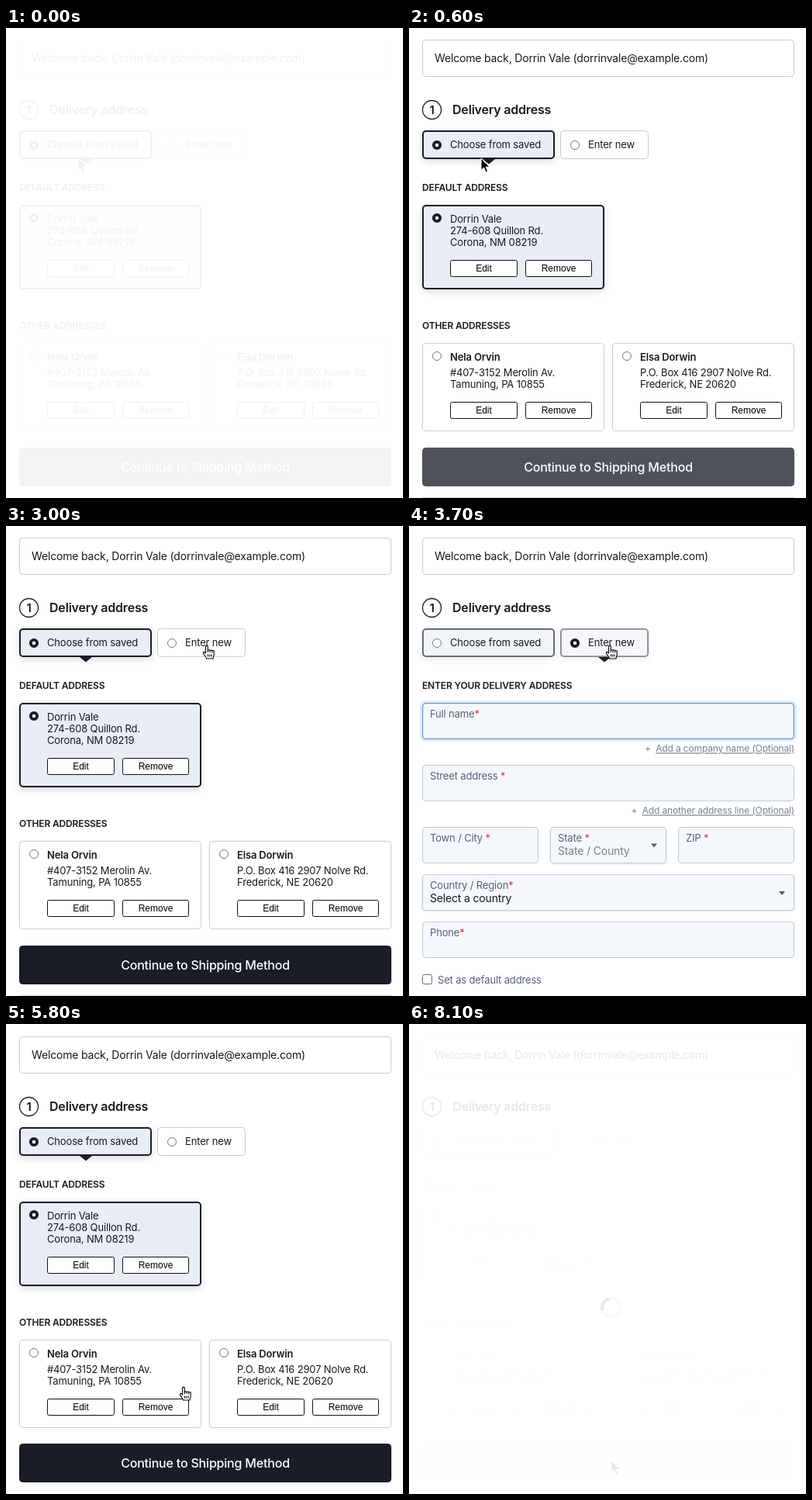
Write an HTML page that moves like this. It is 512 by 606 pixels and loops after 8.2 s.

```html
<!DOCTYPE html>
<html lang="en">
<head>
<meta charset="utf-8">
<title>Delivery address</title>
<style>
  html, body { margin: 0; width: 100%; height: 100%; overflow: hidden; background: #fff; }
  svg { display: block; width: 100vw; height: 100vh; }
  text { font-family: Inter, sans-serif; letter-spacing: -.012em; fill: #171922; }
  .button { font-family: "Liberation Sans", Arial, sans-serif; letter-spacing: 0; fill: #000; }
  .label { fill: #566077; }
  .link { fill: #78808f; }
  .hint { fill: #7b8088; }
  .white { fill: #fff; }
  .star { fill: #d23a3e; }
  .raised { filter: drop-shadow(0 3px 4px rgba(26, 29, 40, .17)); }
  .select { filter: drop-shadow(0 1px 1px rgba(26, 29, 40, .14)); }
</style>
</head>
<body>
<svg id="stage" viewBox="0 0 512 606"></svg>
<script>
const LOOP = 8200, STEP = 100;
const INK = '#1a1d28', LINE = '#c9cdd2', TINT = '#e8edf6';
const OPEN_FORM = 3700, CLOSE_FORM = 5100, SUBMIT = 6500;

// Outer edges are given; the stroke is drawn inside them.
const box = (x, y, w, h, fill = '#fff', stroke = LINE, sw = 1, r = 4, extra = '') =>
  `<rect x="${x + sw / 2}" y="${y + sw / 2}" width="${w - sw}" height="${h - sw}" rx="${r}"
    fill="${fill}" stroke="${stroke}" stroke-width="${sw}" ${extra}/>`;

// y is the middle of the capitals.
const text = (x, y, size, content, weight = 400, cls = '', anchor = 'start') =>
  `<text x="${x}" y="${y + size * .36}" font-size="${size}" font-weight="${weight}"
    class="${cls}" text-anchor="${anchor}">${content}</text>`;

const group = (id, ...parts) => `<g id="${id}">${parts.join('')}</g>`;
const radioOn = (x, y) => `<circle cx="${x}" cy="${y}" r="4.2" fill="#fff" stroke="${INK}" stroke-width="3.8"/>`;
const radioOff = (x, y) => `<circle cx="${x}" cy="${y}" r="5.5" fill="#fff" stroke="#747984"/>`;
const pointer = x => `<path d="M${x - 8} 169h16l-8 6.500z" fill="${INK}"/>`;
const caretDown = (x, y) => `<path d="M${x - 4} ${y - 2.5}h8l-4 5z" fill="#555c68"/>`;
const selected = (x, y, w, h, id) => box(x, y, w, h, TINT, INK, 2, 4, `class="raised" id="${id}"`);

const smallButton = (x, y, w, label) =>
  box(x, y, w, 22, '#fff', '#111', 1, 2) + text(x + w / 2, y + 11, 12, label, 400, 'button', 'middle');
const actions = (x, y) => smallButton(x, y, 87, 'Edit') + smallButton(x + 97, y, 86, 'Remove');

const addressCard = (x, name, street, city) =>
  box(x, 406, 235, 114) + radioOff(x + 19, 423) + text(x + 36, 424, 13, name, 600) +
  text(x + 36, 444, 13, street) + text(x + 36, 459, 13, city) + actions(x + 36, 482);

const field = (x, y, w, label, cls = '') =>
  box(x, y, w, 47, '#f4f8fc', '#c2cad5', 1, 4, `class="${cls}"`) +
  text(x + 10, y + 14, 13, `${label}<tspan class="star">*</tspan>`, 400, 'label');

const optionalLink = (y, label) =>
  text(497, y, 12, `+&#160; <tspan text-decoration="underline">${label}</tspan>`, 400, 'link', 'end');

const header = group('header',
  box(17, 15, 480, 48),
  text(33, 39, 14, 'Welcome back, Dorrin Vale (dorrinvale@example.com)'),
  `<circle cx="29.500" cy="105.500" r="12" fill="none" stroke="${INK}" stroke-width="1.300"/>`,
  text(29.5, 105.5, 15, '1', 600, '', 'middle'),
  text(56, 105.5, 16, 'Delivery address', 600));

const tabs = group('tabs',
  box(17, 132, 171, 37), box(195, 132, 114, 37),
  selected(17, 132, 171, 37, 'savedTab'), selected(195, 132, 114, 37, 'newTab'),
  text(53, 150.5, 13, 'Choose from saved'), text(231, 150.5, 13, 'Enter new'));

const saved = group('saved',
  radioOn(36, 151), radioOff(214, 151), pointer(103),
  text(17, 205.5, 12, 'DEFAULT ADDRESS', 600),
  selected(17, 228, 235, 109, 'defaultCard'), radioOn(36, 245),
  text(53, 246, 13, 'Dorrin Vale'),
  text(53, 261, 13, '274-608 Quillon Rd.'),
  text(53, 276, 13, 'Corona, NM 08219'),
  actions(53, 299),
  text(17, 383.5, 12, 'OTHER ADDRESSES', 600),
  addressCard(17, 'Nela Orvin', '#407-3152 Merolin Av.', 'Tamuning, PA 10855'),
  addressCard(262, 'Elsa Dorwin', 'P.O. Box 416 2907 Nolve Rd.', 'Frederick, NE 20620'));

const form = group('form',
  radioOff(36, 151), radioOn(214, 151), pointer(252),
  text(17, 205.5, 12, 'ENTER YOUR DELIVERY ADDRESS', 600),
  field(17, 228, 480, 'Full name'),
  group('focus',
    box(14, 225, 486, 53, 'none', '#cbe0f6', 3, 6),
    box(17, 228, 480, 47, 'none', '#3475b8', 1.3)),
  `<path id="caret" d="M28.500 250v17" stroke="#111"/>`,
  optionalLink(287, 'Add a company name (Optional)'),
  field(17, 308, 480, 'Street address '),
  optionalLink(367, 'Add another address line (Optional)'),
  field(17, 388, 150, 'Town / City '),
  field(182, 388, 150, 'State ', 'select'),
  text(192, 419, 14, 'State / County', 400, 'hint'), caretDown(316, 412),
  field(347, 388, 150, 'ZIP '),
  field(17, 449, 480, 'Country / Region', 'select'),
  text(27, 480, 14, 'Select a country'), caretDown(481, 473.5),
  field(17, 510, 480, 'Phone'),
  box(17, 578, 13, 13, '#fff', '#666b75', 1, 2),
  text(37, 585, 13, 'Set as default address', 400, 'label'));

const submit = group('submit',
  box(17, 541, 480, 50, INK, INK, 1),
  box(19, 543, 476, 46, 'none', '#fff', 1, 3, 'id="pressed"'),
  text(257, 566, 16, 'Continue to Shipping Method', 500, 'white', 'middle'));

const spinner = `<g id="spinner" fill="none" stroke-width="4">
  <circle cx="261" cy="366" r="12" stroke="#c5cad9"/>
  <path id="arc" d="M252.500 357.500a12 12 0 0 1 17 0" stroke="${INK}"/></g>`;

const cursor = `<g id="cursor" stroke-linejoin="round">
  <path id="arrow" d="M0 0V15.300L3.500 12 6 18 8.600 16.900 6.100 11.100H11Z" fill="#000" stroke="#fff"/>
  <g id="hand" stroke="#000" stroke-width="1.100">
    <path fill="#fff" d="M-1.500 1.500a1.400 1.400 0 0 1 2.800 0V6.500a1.400 1.200 0 0 1 2.700 .300a1.400 1.200 0 0 1 2.700 .500
      a1.300 1.200 0 0 1 2.500 .800V12C9.200 14 8 15 8 17H-.500C-.500 15-3 13-4.300 10.500C-5.300 8.800-3.500 7.800-2.600 8.800L-1.500 10Z"/>
    <path fill="none" d="M1.300 6.500V9M4 7V9M6.700 7.500V9.500M1.500 11.500V14.500M3.800 11.500V14.500M6 11.500V14.500"/>
  </g></g>`;

document.getElementById('stage').innerHTML = group('page', header,
  group('content', group('body', tabs, saved, form), submit,
    `<path id="rule" d="M17 605.500h480" stroke="${LINE}"/>`),
  spinner, cursor);

const $ = id => document.getElementById(id);
const show = (id, on) => $(id).setAttribute('display', on ? 'inline' : 'none');
const fade = (id, value) => $(id).setAttribute('opacity', value);
const move = (id, value) => $(id).setAttribute('transform', value);
const ramp = (t, from, to) => Math.max(0, Math.min(1, (t - from) / (to - from)));

// time, x, y of the cursor's hot spot
const path = [
  [0, 93, 168], [600, 93, 168], [900, 103, 157], [1300, 113, 157], [1400, 113, 157],
  [1700, 130, 177], [1900, 165, 186], [2300, 258, 157], [2400, 259, 154], [4700, 259, 154],
  [5000, 86, 156], [5500, 86, 156], [5800, 229, 468], [6000, 264, 567], [6400, 261, 563], [LOOP, 261, 563]
];

function cursorAt(t) {
  const next = path.findIndex(p => p[0] > t);
  const [t0, x0, y0] = path[next - 1], [t1, x1, y1] = path[next];
  const k = ramp(t, t0, t1);
  return [x0 + (x1 - x0) * k, y0 + (y1 - y0) * k];
}

function draw(t) {
  const formOpen = t >= OPEN_FORM && t < CLOSE_FORM;
  const appear = Math.min(1, .06 + .94 * t / 600);
  const submitAppear = Math.min(1, .05 + .95 * t / 800);
  const leave = 1 - 1.125 * ramp(t, 7300, 8300) * 1;
  const toNew = ramp(t, 3600, 3850) - ramp(t, 5000, 5300);
  const loading = ramp(t, SUBMIT - 100, 6900);
  const nudge = `translate(0 ${t >= CLOSE_FORM ? 1 : 0})`;

  fade('page', Math.max(0, appear * leave));
  fade('submit', submitAppear / appear);
  fade('content', 1 - .925 * loading);
  fade('savedTab', 1 - toNew);
  fade('newTab', toNew);
  fade('focus', ramp(t, 3550, 3800));
  fade('spinner', loading);
  move('header', nudge);
  move('body', nudge);
  move('arc', `rotate(${180 + (t - 7100) * 360 / 750} 261 366)`);

  show('saved', !formOpen);
  show('submit', !formOpen);
  show('form', formOpen);
  show('rule', t < OPEN_FORM);
  show('caret', t >= 4100 && t < 4600);
  show('pressed', t >= SUBMIT);

  const isArrow = t < 700 || (t >= 1500 && t < 2200) || t >= SUBMIT;
  show('arrow', isArrow);
  show('hand', !isArrow);
  move('cursor', `translate(${cursorAt(t).join(' ')})`);
}

const start = performance.now();
function tick() {
  const t = (performance.now() - start) % LOOP;
  draw(Math.floor(t / STEP) * STEP);
  requestAnimationFrame(tick);
}
tick();
</script>
</body>
</html>
```
